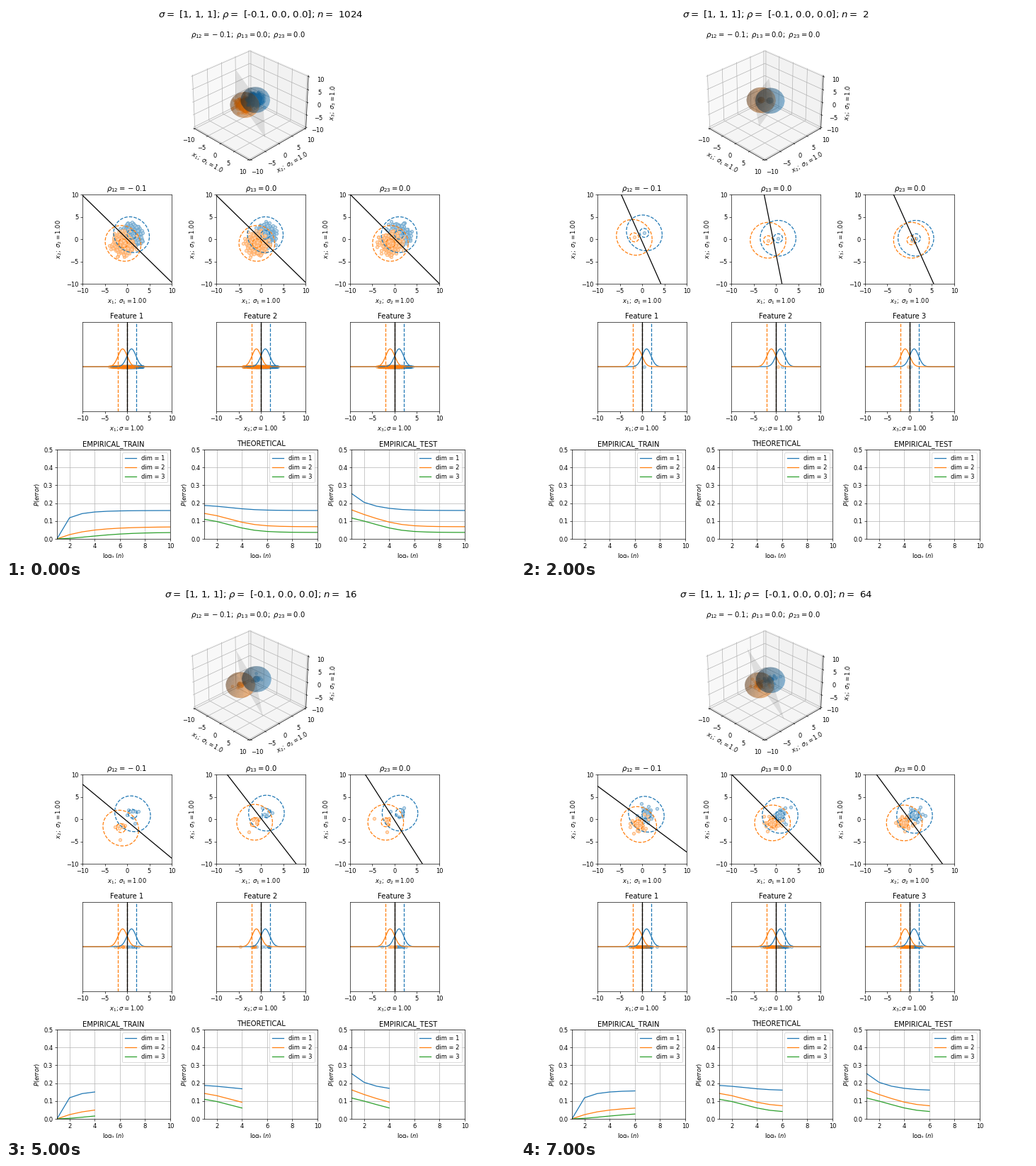
Recreate the animation shown at these times as a matplotlib script. Size 719x779 px, loop 8 s.

```python
import numpy as np
import matplotlib.pyplot as plt
from matplotlib.animation import FuncAnimation
from matplotlib.colors import to_rgb

W, H, DPI = 719, 779, 60
FIG_W, FIG_H = W + 0.01, H + 0.01
BLUE, ORANGE = "C0", "C1"
COLORS = (BLUE, ORANGE)
SIZES = [1024, 0, 2, 4, 8, 16, 32, 64]
PAIRS = [(0, 1), (0, 2), (1, 2)]
RHO = [-0.1, 0.0, 0.0]
COV = np.array([[1, -0.1, 0], [-0.1, 1, 0], [0, 0, 1]])
TICKS = range(-10, 11, 5)

# Class means wander for small samples and settle at +1 and -1
MEAN_STEPS = [2, 3, 4, 6, 10]
BLUE_PATH = np.array([(0.5, 1.4, 0.2), (0.5, 1.15, 0.4), (1.25, 1.2, 1.35),
                      (0.95, 1.1, 0.85), (1, 1, 1)])
ORANGE_PATH = np.array([(-1.75, 0.4, -0.25), (-1.2, -0.25, -0.2),
                        (-1.4, -2, -0.7), (-0.75, -1.2, -0.85),
                        (-0.9, -0.95, -0.95)])

# Per dimension: final error, theory gap, test gap, training rate and power
ERROR_LAWS = [(0.159, 0.033, 0.067, 1.36, 0.7),
              (0.068, 0.087, 0.020, 0.43, 1.0),
              (0.036, 0.086, 0.007, 0.09, 1.7)]
ERROR_NAMES = ["EMPIRICAL_TRAIN", "THEORETICAL", "EMPIRICAL_TEST"]

fig = plt.figure(figsize=(FIG_W / DPI, FIG_H / DPI), dpi=DPI)
heading = fig.text(360 / FIG_W, (H - 16) / FIG_H, "", fontsize=16, ha="center")


def add_axes(left, top, width, height, **kw):
    """Axes placed in pixels from the top left corner."""
    return fig.add_axes([left / FIG_W, (H - top - height) / FIG_H,
                         width / FIG_W, height / FIG_H], **kw)


def make_space():
    ax = add_axes(253, 49.4, 178, 178, projection="3d")
    ax.view_init(30, -45)
    lim = (-10 * 25 / 24, 10 * 25 / 24)
    ax.set(xlim=lim, ylim=lim, zlim=lim, xticks=TICKS, yticks=TICKS, zticks=TICKS)
    for k, axis in enumerate("xyz", 1):
        ax.set(**{f"{axis}label": rf"$x_{k};\ \sigma_{k}=1.0$"})
    ax.set_title(r"$\rho_{12}={}-0.1;\ \rho_{13}=0.0;\ \rho_{23}=0.0$")
    return ax


def make_pair(col, i, j):
    ax = add_axes(108 + 189 * col, 266, 126, 126)
    sign = "{}" if RHO[col] < 0 else ""
    ax.set(xlim=(-10, 10), ylim=(-10, 10), xticks=TICKS, yticks=TICKS,
           xlabel=rf"$x_{i + 1};\ \sigma_{i + 1}=1.00$",
           ylabel=rf"$x_{j + 1};\ \sigma_{j + 1}=1.00$",
           title=rf"$\rho_{{{i + 1}{j + 1}}}={sign}{RHO[col]}$")
    return ax


def make_feature(col):
    ax = add_axes(108 + 189 * col, 446, 126, 126)
    x = np.linspace(-10, 10, 400)
    for mu, color in zip((1, -1), COLORS):
        ax.plot(x, np.exp(-(x - mu) ** 2 / 2) / np.sqrt(2 * np.pi), color=color)
        for edge in (mu - 1, mu + 1):
            ax.axvline(edge, color=color, ls="--")
    ax.set(xlim=(-10, 10), ylim=(-1, 1), xticks=TICKS, yticks=[],
           xlabel=rf"$x_{col + 1}; \sigma=1.00$", title=f"Feature {col + 1}")
    return ax


def make_errors(col, name):
    ax = add_axes(72 + 208 * col, 626, 160, 126)
    lines = [ax.plot([], [], label=f"dim = {d}")[0] for d in (1, 2, 3)]
    ax.set(xlim=(1, 10), ylim=(0, 0.5), xticks=range(2, 11, 2),
           yticks=np.arange(6) / 10, xlabel=r"$\log_2(n)$",
           ylabel="$P(error)$", title=name)
    ax.grid(True)
    ax.legend(loc="upper right")
    return lines


space = make_space()
pair_axes = [make_pair(c, i, j) for c, (i, j) in enumerate(PAIRS)]
feature_axes = [make_feature(c) for c in range(3)]
error_lines = [make_errors(c, name) for c, name in enumerate(ERROR_NAMES)]
live = []


def tint(color, amount):
    """Mix a colour with white."""
    return tuple(1 - amount * (1 - c) for c in to_rgb(color))


def class_means(n):
    step = np.log2(n)
    return [np.array([np.interp(step, MEAN_STEPS, c) for c in path.T])
            for path in (BLUE_PATH, ORANGE_PATH)]


def samples(n, means):
    """Random points of both classes, centred on their means."""
    rng = np.random.default_rng(n)
    clouds = []
    for mean in means:
        pts = rng.multivariate_normal([0, 0, 0], COV, n // 2)
        clouds.append(pts - pts.mean(axis=0) + mean)
    return clouds


def errors(k):
    """Training, theoretical and test error for each dimension."""
    train, theory, test = [], [], []
    for final, gap, extra, rate, power in ERROR_LAWS:
        train.append(final * (1 - np.exp(-rate * (k - 1) ** power)))
        theory.append(final + gap / (1 + np.exp(0.9 * (k - 3))))
        test.append(theory[-1] + extra * 3.0 ** (1 - k))
    return train, theory, test


def draw_space(means, clouds):
    u, v = np.meshgrid(np.linspace(0, 2 * np.pi, 25), np.linspace(0, np.pi, 13))
    ball = np.stack([np.cos(u) * np.sin(v), np.sin(u) * np.sin(v), np.cos(v)])
    ball = np.einsum("ij,jkl->ikl", np.linalg.cholesky(COV), ball)
    for mean, pts, color in zip(means, clouds, COLORS):
        live.append(space.scatter(*pts.T, s=20, color=color, alpha=0.25))
        for r in (1, 4):
            xyz = r * ball + mean[:, None, None]
            live.append(space.plot_surface(*xyz, color=color, alpha=0.3,
                                           linewidth=0))
    mid, diff = (means[0] + means[1]) / 2, means[0] - means[1]
    y, z = np.meshgrid([-5.0, 5.0], [-5.0, 5.0])
    x = mid[0] - (diff[1] * (y - mid[1]) + diff[2] * (z - mid[2])) / diff[0]
    live.append(space.plot_surface(x, y, z, color="k", alpha=0.1, linewidth=0))


def draw_pairs(means, clouds):
    t = np.linspace(0, 2 * np.pi, 100)
    circle = np.array([np.cos(t), np.sin(t)])
    mid, diff = (means[0] + means[1]) / 2, means[0] - means[1]
    for ax, (i, j) in zip(pair_axes, PAIRS):
        root = np.linalg.cholesky(COV[np.ix_([i, j], [i, j])])
        for mean, pts, color in zip(means, clouds, COLORS):
            live.append(ax.scatter(pts[:, i], pts[:, j], s=25, lw=1.2, alpha=0.8,
                                   facecolor=tint(color, 0.35),
                                   edgecolor=tint(color, 0.65)))
            for r in (1, 4):
                x, y = r * root @ circle
                live.extend(ax.plot(x + mean[i], y + mean[j], "--", color=color))
        live.append(ax.axline((mid[i], mid[j]), slope=-diff[i] / diff[j],
                              color="k"))


def draw_features(clouds):
    for k, ax in enumerate(feature_axes):
        for pts, color in zip(clouds, COLORS):
            live.append(ax.scatter(pts[:, k], np.zeros(len(pts)), s=25, lw=1.2,
                                   color=color, alpha=0.3))
        live.append(ax.axvline(0, color="k"))


def update(frame):
    n = SIZES[frame]
    while live:
        live.pop().remove()
    heading.set_text(rf"$\sigma=$ [1, 1, 1]; $\rho=$ [-0.1, 0.0, 0.0]; $n=$ {n}")
    steps = np.arange(1, n.bit_length())
    for lines, curves in zip(error_lines, errors(steps)):
        for line, curve in zip(lines, curves):
            line.set_data(steps, curve)
    if n:
        means = class_means(n)
        clouds = samples(n, means)
        draw_space(means, clouds)
        draw_pairs(means, clouds)
        draw_features(clouds)
    return []


anim = FuncAnimation(fig, update, frames=len(SIZES), interval=1000,
                     repeat=True, repeat_delay=0)
plt.show()
```
